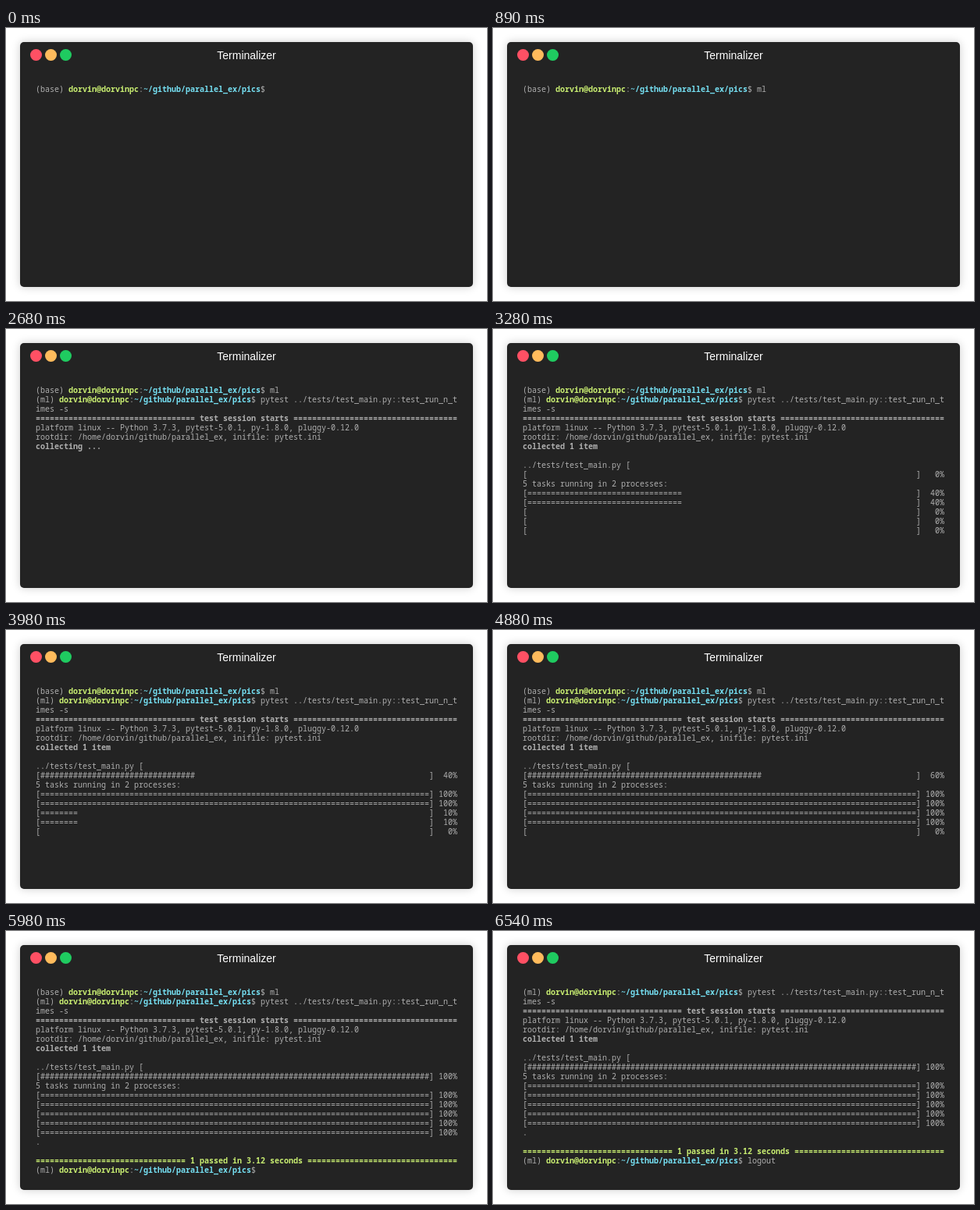
Recreate the animation shown at these times as an HTML page. Size 616 by 350 pixels, loop 7 s.

```html
<!DOCTYPE html>
<html lang="en">
<head>
<meta charset="utf-8">
<title>Terminal</title>
<style>
  html, body { margin: 0; width: 100%; height: 100%; overflow: hidden; background: #fff; }
  .window {
    position: absolute; left: 18px; top: 18px; width: 580px; height: 314px;
    border-radius: 5px; background: #232323; box-shadow: 0 0 12px rgba(0, 0, 0, .2);
  }
  .title {
    position: absolute; top: 9px; width: 100%; text-align: center;
    font: 14px/16px "Liberation Sans", Arial, sans-serif; color: #fff;
  }
  .dot { position: absolute; top: 9px; width: 15px; height: 15px; border-radius: 50%; }
  pre {
    position: absolute; left: 20px; top: 54px; margin: 0;
    font: 10px/12px "Noto Sans Mono", "DejaVu Sans Mono", monospace; color: #afafaf;
  }
  .user { color: #c8ed71; }
  .path { color: #75dff2; }
</style>
</head>
<body>
<div class="window">
  <div class="dot" style="left: 13px; background: #ff5064"></div>
  <div class="dot" style="left: 32px; background: #ffbb5c"></div>
  <div class="dot" style="left: 51px; background: #1fcb60"></div>
  <div class="title">Terminalizer</div>
  <pre id="screen"></pre>
</div>
<script>
const LOOP = 7000, COLUMNS = 90, BAR = 83;
const TASK_START = 2880, TASK_TIME = 1000, TASKS = 5;
const screen = document.getElementById('screen');

const prompt = env =>
  `(${env}) <b class="user">dorvin@dorvinpc</b>:<b class="path">~/github/parallel_ex/pics</b>$ `;

const rule = text => {
  const left = Math.floor((COLUMNS - text.length - 2) / 2);
  return `${'='.repeat(left)} ${text} `.padEnd(COLUMNS, '=');
};

const bar = (mark, percent) =>
  `[${mark.repeat(Math.round(BAR * percent / 100)).padEnd(BAR)}]${`${percent}%`.padStart(5)}`;

// Two tasks run at a time, each gaining 10% every 100 ms.
function progress(t) {
  let done = 0;
  const rows = [];
  for (let i = 0; i < TASKS; i++) {
    const elapsed = t - TASK_START - Math.floor(i / 2) * TASK_TIME;
    rows.push(bar('=', Math.max(0, Math.min(100, Math.floor(elapsed / 100) * 10))));
    // The second task of a pair is counted one tick later.
    if (elapsed >= TASK_TIME + (i % 2) * 100) done++;
  }
  return [bar('#', done * 100 / TASKS), '5 tasks running in 2 processes:', ...rows];
}

function terminal(t) {
  const lines = [prompt('base') + (t < 760 ? '' : t < 890 ? 'm' : 'ml')];
  if (t >= 1220) lines.push(prompt('ml'));
  if (t >= 1760) {
    lines[1] += 'pytest ../tests/test_main.py::test_run_n_t';
    lines.push('imes -s');
  }
  if (t >= 2680) {
    lines.push(
      `<b>${rule('test session starts')}</b>`,
      'platform linux -- Python 3.7.3, pytest-5.0.1, py-1.8.0, pluggy-0.12.0',
      'rootdir: /home/dorvin/github/parallel_ex, inifile: pytest.ini',
      `<b>${t < 2780 ? 'collecting ...' : 'collected 1 item'}</b>`);
  }
  if (t >= 2780) lines.push('', '../tests/test_main.py [');
  if (t >= TASK_START) lines.push(...progress(t));
  if (t >= 5930) lines.push('.', '', `<b class="user">${rule('1 passed in 3.12 seconds')}</b>`);
  if (t >= 5980) lines.push(prompt('ml'));
  if (t >= 6540) {
    lines[lines.length - 1] += 'logout';
    lines.shift(); // the final line break scrolls the screen
  }
  return lines.join('\n');
}

const start = performance.now();
let shown;
function draw() {
  const html = terminal((performance.now() - start) % LOOP);
  if (html !== shown) screen.innerHTML = shown = html;
  requestAnimationFrame(draw);
}
draw();
</script>
</body>
</html>
```
